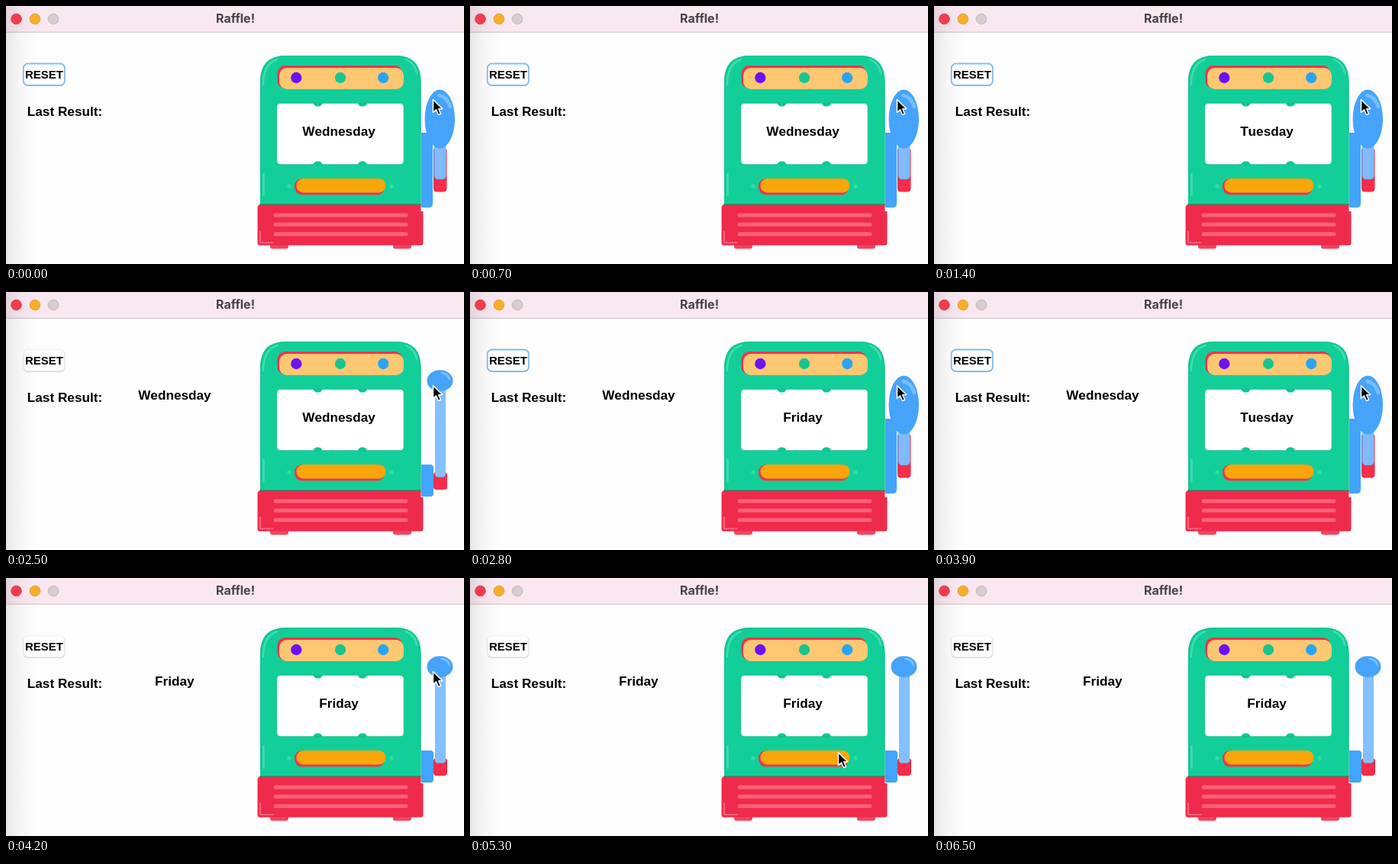
Recreate the animation shown at these times as an HTML page. Size 600 by 338 pixels, loop 7 s.

```html
<!DOCTYPE html>
<html lang="en">
<head>
<meta charset="utf-8">
<title>Raffle!</title>
<style>
  html, body { margin: 0; width: 100%; height: 100%; overflow: hidden; background: #fefdfe; }
  svg { display: block; width: 100vw; height: 100vh; }
  text { font: bold 17.2px "Liberation Sans", Arial, sans-serif; font-kerning: none; }
  .mid { text-anchor: middle; }
  .line { fill: none; stroke-linecap: round; stroke-linejoin: round; }
</style>
</head>
<body>
<svg viewBox="0 0 600 338">
  <defs>
    <linearGradient id="shade">
      <stop offset="0" stop-color="#201820" stop-opacity=".1"/>
      <stop offset=".4" stop-color="#201820" stop-opacity=".035"/>
      <stop offset="1" stop-color="#201820" stop-opacity="0"/>
    </linearGradient>
    <filter id="soft" x="-5%" y="-5%" width="110%" height="110%" color-interpolation-filters="sRGB">
      <feGaussianBlur stdDeviation=".45"/>
    </filter>
  </defs>

  <!-- Window -->
  <rect width="600" height="338" fill="#fefdfe"/>
  <rect width="600" height="34" fill="#f9e8ef"/>
  <rect y="33.6" width="600" height="1.4" fill="#d6ccd0"/>
  <rect width="40" height="338" fill="url(#shade)"/>
  <g stroke-width="1">
    <circle cx="13.5" cy="17" r="6.8" fill="#f23c50" stroke="#dd3a4c"/>
    <circle cx="38" cy="17" r="6.8" fill="#f6ae2a" stroke="#e2a02c"/>
    <circle cx="62" cy="17" r="6.8" fill="#d6cdd1" stroke="#c1b8bc"/>
  </g>
  <text class="mid" x="300.5" y="22" fill="#494246" style="font:bold 16px Inter,sans-serif">Raffle!</text>

  <!-- Controls -->
  <g id="plain">
    <rect x="22.5" y="76" width="55" height="29" rx="6" fill="#dcdadc"/>
    <rect x="23.3" y="75.8" width="53.4" height="27.8" rx="5.5" fill="#fff" stroke="#e6e4e6" stroke-width=".7"/>
  </g>
  <rect id="focused" x="22.8" y="75.5" width="54.2" height="28.5" rx="6" fill="#fff" stroke="#83bbea" stroke-width="1.8"/>
  <text class="mid" x="50" y="95.3" style="font-size:15px">RESET</text>
  <text x="27.8" y="144">Last Result:</text>
  <text id="result" class="mid" x="220.9" y="141.2"></text>

  <!-- Cabinet -->
  <g filter="url(#soft)">
    <path d="M333 262V99Q333 65 367 65H510Q543.5 65 543.5 99V262Z" fill="#12cf9a"/>
    <path class="line" d="M333.7 261V99Q333.7 65.7 367 65.7H510Q542.8 65.7 542.8 99V261" stroke="#16c090" stroke-width="1.3"/>
    <g class="line" stroke="#4adbb2" stroke-width="2.3">
      <path d="M337 103Q337 76 355 70M337.5 220V248M524 70Q536 75 538 88"/>
    </g>
    <rect x="355.5" y="78" width="164" height="30" rx="10" fill="#ee344e"/>
    <rect x="358" y="81" width="163" height="28" rx="10" fill="#fdc772"/>
    <circle cx="380.3" cy="94" r="7.2" fill="#6b12f4"/>
    <circle cx="438" cy="94" r="7.2" fill="#18c592"/>
    <circle cx="494.2" cy="94" r="7.2" fill="#27a5f3"/>
    <rect x="354.7" y="127.3" width="166.5" height="80.4" rx="5" fill="#fff" stroke="#1ab88b" stroke-width=".8"/>
    <path d="M402 126.5H415Q413 131.5 410 131.5H407Q404 131.5 402 126.5M460.5 126.5H473.5Q471.5 131.5 468.5 131.5H465.5Q462.5 131.5 460.5 126.5M402 208.5H415Q413 203.5 410 203.5H407Q404 203.5 402 208.5M460.5 208.5H473.5Q471.5 203.5 468.5 203.5H465.5Q462.5 203.5 460.5 208.5" fill="#12c493"/>
    <rect x="378" y="226" width="118" height="21.2" rx="9.5" fill="#ee344e"/>
    <rect x="380.5" y="226" width="117" height="18.5" rx="9" fill="#f9a60b"/>
    <circle cx="371" cy="236.3" r="2.7" fill="#32dbae"/>
    <circle cx="505" cy="236.3" r="2.7" fill="#32dbae"/>
    <path d="M346 312H370V315Q370 318 367 318H349Q346 318 346 315ZM507 312H531V315Q531 318 528 318H510Q507 318 507 315Z" fill="#f2465f"/>
    <path d="M333 260.5H543.5V269H546.5V310.5Q546.5 313.5 543.5 313.5H332.5Q329.5 313.5 329.5 310.5V264Q329.5 260.5 333 260.5Z" fill="#f02a4a"/>
    <path d="M332 260.3H543.5" stroke="#6d6a5c" stroke-width="2"/>
    <path class="line" d="M353 274H524M353 286.3H524M353 298.7H524" stroke="#fa627b" stroke-width="5"/>
    <path class="line" d="M333 295V310H350" stroke="#fa7188" stroke-width="1.7"/>
  </g>
  <text id="reel" class="mid" x="436" y="169.6"></text>

  <!-- Lever -->
  <g id="leverUp" filter="url(#soft)">
    <rect x="560" y="236" width="18" height="23" rx="4" fill="#f12e4b"/>
    <path d="M562 124H576V238Q576 242.5 571.5 242.5H566.5Q562 242.5 562 238Z" fill="#84c0fc"/>
    <ellipse cx="568.5" cy="116.2" rx="17" ry="14" fill="#46a3fa"/>
    <path class="line" d="M571 106Q579 107 581 114" stroke="#78bdfd" stroke-width="3"/>
    <path d="M544 226H556Q560 226 560 230V264Q560 268 556 268H544Z" fill="#43a4fb"/>
  </g>
  <g id="leverDown" filter="url(#soft)">
    <path d="M560 187.5H577.5V239Q577.5 243.5 573 243.5H564.5Q560 243.5 560 239Z" fill="#f12e4b"/>
    <path d="M561 178H576.5V221Q576.5 227 571 227H566.5Q561 227 561 221Z" fill="#7dbbfb"/>
    <path d="M544 166H559V259Q559 264 554 264H544Z" fill="#43a4fb"/>
    <ellipse cx="568.3" cy="148" rx="19.7" ry="38.5" fill="#46a3fa"/>
    <path class="line" d="M567.5 117Q578 119 582 132" stroke="#78bdfd" stroke-width="4.5"/>
  </g>

  <path id="cursor" d="M0 0V17L4 13.4L7 20L10 18.7L7.2 12.3H12.3Z" fill="#000" stroke="#fff" stroke-width="1.5" stroke-linejoin="round"/>
</svg>
<script>
  const LOOP = 7000, STEP = 100;
  const days = { M: "Monday", T: "Tuesday", W: "Wednesday", H: "Thursday", F: "Friday" };
  const spins = [
    { start: 0, end: 1500, reel: "WFMTHMFWHTFMWHT", result: "W" },
    { start: 2600, end: 4100, reel: "MHFWMFHTWMFHMTW", result: "F" }
  ];
  const $ = id => document.getElementById(id);
  const show = (id, on) => $(id).setAttribute("visibility", on ? "visible" : "hidden");
  const write = (id, text) => { if ($(id).textContent !== text) $(id).textContent = text; };

  function render(t) {
    const spin = spins.find(s => t >= s.start && t < s.end);
    const last = spins.filter(s => t >= s.end).pop();
    const result = last ? days[last.result] : "";
    write("result", result);
    write("reel", spin ? days[spin.reel[Math.floor((t - spin.start) / STEP)]] : result);
    for (const id of ["focused", "leverDown"]) show(id, spin);
    for (const id of ["plain", "leverUp"]) show(id, !spin);

    // The pointer drifts off the lever, then hides.
    const p = Math.min(1, Math.max(0, (Math.floor(t / STEP) * STEP - 4600) / 700));
    const ease = p * p * (3 - 2 * p);
    $("cursor").setAttribute("transform", `translate(${559.5 - 77 * ease} ${122.5 + 106 * ease})`);
    show("cursor", t < 5400);
  }

  function frame() {
    render(performance.now() % LOOP);
    requestAnimationFrame(frame);
  }
  frame();
</script>
</body>
</html>
```
